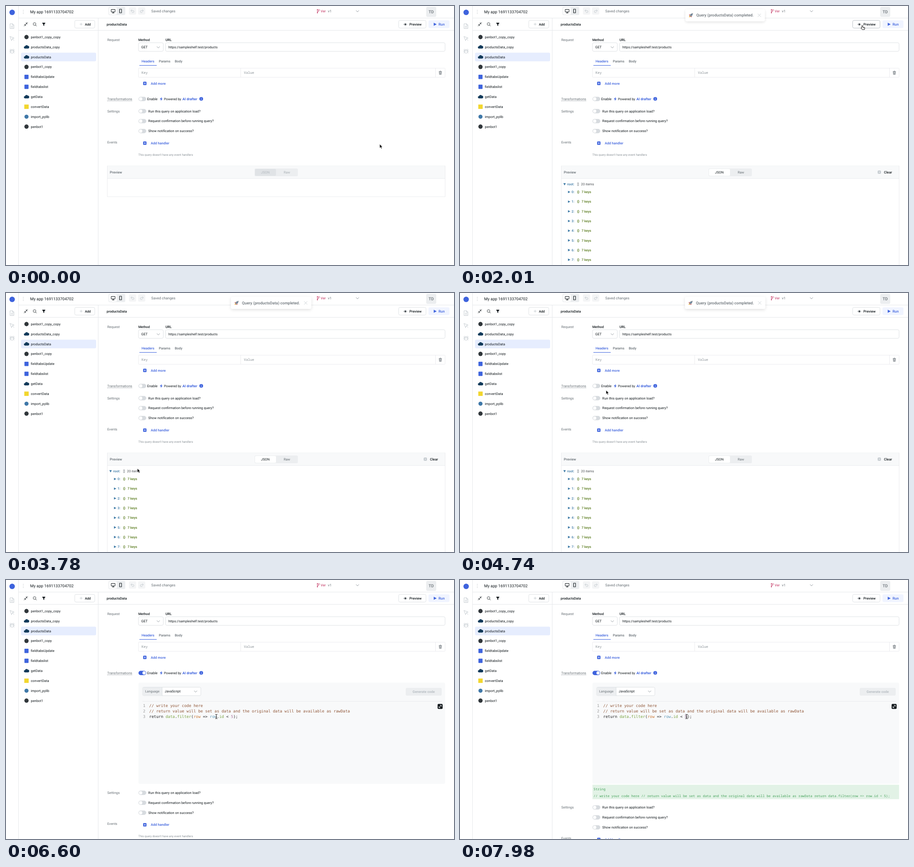
These frames come from a looping animation (984 by 569 pixels, 8 s). An HTML page:

```html
<!DOCTYPE html>
<html lang="en">
<head>
<meta charset="utf-8">
<title>Query editor</title>
<style>
  html, body { margin: 0; width: 100%; height: 100%; overflow: hidden; background: #fff; }
  svg { display: block; width: 100vw; height: 100vh; }
  text { font-family: Roboto, "Open Sans", sans-serif; text-rendering: geometricPrecision; white-space: pre; }
  .mono { font-family: "Noto Sans Mono", "DejaVu Sans Mono", monospace; }
  .code { font-family: "DejaVu Sans Mono", "Noto Sans Mono", monospace; }
</style>
</head>
<body>
<svg id="stage" viewBox="0 0 984 569"></svg>
<script>
const LOOP = 8000;
const INK = '#11181c', GREY = '#687076', SOFT = '#889096', PALE = '#c1c8cd',
      EDGE = '#d7dbdf', LINE = '#e6e8eb', FILL = '#eceef0', PANEL = '#f8f9fa',
      BLUE = '#3e63dd', TREE = '#3d7aa6', GREEN = '#587a1c';

// Drawing helpers; text is centred vertically on y.
const text = (x, y, s, { size = 7.4, color = INK, weight = 400, anchor = 'start', cls = '', id = '' } = {}) =>
  `<text id="${id}" class="${cls}" x="${x}" y="${y + size * 0.35}" font-size="${size}" font-weight="${weight}" fill="${color}" text-anchor="${anchor}">${s}</text>`;
const rect = (x1, y1, x2, y2, fill, stroke = 'none', r = 0, extra = '') =>
  `<rect x="${x1}" y="${y1}" width="${x2 - x1}" height="${y2 - y1}" rx="${r}" fill="${fill}" stroke="${stroke}" stroke-width=".8" ${extra}/>`;
const path = (d, color, width = 0.9, extra = '') =>
  `<path d="${d}" fill="none" stroke="${color}" stroke-width="${width}" stroke-linecap="round" stroke-linejoin="round" ${extra}/>`;
const shape = (d, fill, extra = '') => `<path d="${d}" fill="${fill}" ${extra}/>`;
const dot = (x, y, r, fill, extra = '') => `<circle cx="${x}" cy="${y}" r="${r}" fill="${fill}" ${extra}/>`;
const group = (id, ...parts) => `<g id="${id}">${parts.join('')}</g>`;
const chevron = (x, y) => path(`M${x - 3} ${y - 1.5}l3 3 3-3`, SOFT);
const toggle = (y, id = '') =>
  rect(291, y - 4.7, 308, y + 4.7, EDGE, 'none', 4.7, id && `id="${id}Track"`) +
  dot(295.8, y, 3.6, '#fff', id && `id="${id}Knob"`);
const plusLink = (y, label) =>
  rect(301.2, y - 3.7, 308.6, y + 3.7, BLUE, 'none', 1.5) +
  path(`M303.2 ${y}h3.4M304.9 ${y - 1.7}v3.4`, '#fff', 0.8) +
  text(318, y, label, { size: 7.5, weight: 500, color: BLUE });
const spinner = (id, x, y, r, width, color) =>
  `<g transform="translate(${x} ${y})"><g id="${id}">` +
  path(`M${r * 0.71} ${r * 0.71}A${r} ${r} 0 1 1 ${r * 0.71} ${-r * 0.71}`, color, width) + '</g></g>';

const icons = {
  bot: y => dot(45, y, 4.7, '#30363a'),
  cloud: y => shape(`M42 ${y + 3.5}a2.5 2.5 0 0 1-.3-5 3.6 3.6 0 0 1 6.3-1 3 3 0 0 1 0 6z`, '#123a5a'),
  table: y => rect(40.5, y - 4.7, 49.5, y + 4.7, BLUE, 'none', 1),
  script: y => rect(40.2, y - 4.8, 49.8, y + 4.8, '#f2d62e'),
  snake: y => dot(45, y, 4.5, '#3f78a8')
};
const queries = [
  ['bot', 'penbot1_copy_copy'], ['cloud', 'productsData_copy'], ['cloud', 'productsData'],
  ['bot', 'penbot1_copy'], ['table', 'fieldtabsUpdate'], ['table', 'fieldtabslist'],
  ['cloud', 'getData'], ['script', 'convertData'], ['snake', 'import_pylib'], ['bot', 'penbot1']
];

const frameBars =
  path('M27.5 0V569M202.5 27V569M27.5 26.5H984M27.5 53.5H984', LINE, 1);

const rail =
  dot(13.5, 14, 6, BLUE) +
  path('M9.3 39h5l3 3v7.5h-8zM14.3 39v3h3M11.3 44.5h4M11.3 47h4', PALE) +
  path('M9 67l9 3.5-4 1.4-1.6 4zM14 72l3.5 3.5', PALE) +
  path('M10 99a3.3 3.3 0 0 1 6.6 0v1.5a3.3 3.3 0 0 1-6.6 0zM11.3 96l-1-1.5M15.3 96l1-1.5M10 97.5l-2-1M16.6 97.5l2-1M10 100h-2.2M16.6 100h2.2M10.3 102l-1.8 1.4M16.3 102l1.8 1.4M10 98.6h6.6', PALE);

const topBar =
  [9.5, 13, 16.5].map(y => dot(38, y, 0.6, SOFT)).join('') +
  text(53, 13, 'My app 1691133704702', { size: 8.83 }) +
  rect(225, 2, 262, 20, FILL, 'none', 3) + rect(226.5, 3.3, 243.5, 18.7, '#fff', 'none', 2.5) +
  path('M231.5 7.5h8v5.5h-8zM235.5 13v2.3M233.3 15.3h4.4', INK, 1) +
  path('M249.4 7h4.4v8h-4.4z', INK, 1.1) +
  rect(270, 3, 286, 19, '#f4f5f6', 'none', 3) + rect(290, 3, 306, 19, '#f4f5f6', 'none', 3) +
  path('M276.5 8l-2.3 2.2 2.3 2.2M274.4 10.2h4.6a2 2 0 0 1 0 4.2h-2', PALE) +
  path('M299.5 8l2.3 2.2-2.3 2.2M301.6 10.2h-4.6a2 2 0 0 0 0 4.2h2', PALE) +
  text(319, 11.3, 'Saved changes', { size: 7.9, color: GREY, id: 'saveState' }) +
  path('M684 9v6M687 9.5v1.5a1.6 1.6 0 0 1-1.6 1.6H684', '#c2315f') +
  dot(684, 8.2, 1.1, '#c2315f') + dot(687.4, 8.6, 1.1, '#c2315f') + dot(684, 15, 1.1, '#c2315f') +
  text(691, 11.5, 'Ver', { size: 7.6, color: '#c2315f' }) +
  text(707, 11.5, 'v1', { size: 7.6, color: GREY }) + chevron(772, 11.5) +
  rect(923, 2, 945, 24, FILL, 'none', 3) +
  text(934, 13.3, 'TD', { size: 9, color: GREY, weight: 500, anchor: 'middle' });

const sidebar =
  path('M47.5 36l-3 3M44.3 36.8v2.4h2.4M39.8 44l3-3M43 43.2v-2.4h-2.4', INK) +
  `<circle cx="62.7" cy="39.6" r="3" fill="none" stroke="${INK}" stroke-width=".8"/>` + path('M65 42l2 2', INK, 0.8) +
  shape('M79.8 36.8h6.4v1.2l-2.3 2.6v3.4l-1.8-1v-2.4l-2.3-2.6z', INK) +
  rect(151, 31.5, 195, 48.5, '#fff', EDGE, 3) +
  path('M162.3 40h5.4M165 37.3v5.4', PALE) +
  text(179.7, 40, 'Add', { size: 7.3, weight: 500, anchor: 'middle' }) +
  rect(33, 102.5, 198, 121.5, '#e6edfe', 'none', 3) +
  queries.map(([icon, name], i) => {
    const y = 68.2 + i * 21.87;
    return icons[icon](y) + text(54.5, y, name);
  }).join('');

const queryHeader =
  text(221, 40.2, 'productsData', { weight: 500 }) +
  rect(862.5, 31.5, 922.5, 48.5, '#fff', EDGE, 3, 'id="previewButton"') +
  group('previewLabel',
    path('M873.8 40.5q3.4-4.6 6.8 0-3.4 4-6.8 0z', GREY, 0.8), dot(877.2, 40.5, 1.4, INK),
    text(886, 40, 'Preview', { size: 7.6, weight: 500 })) +
  group('previewBusy', spinner('smallSpin', 892.5, 40, 3.7, 0.9, '#8fa5e6')) +
  rect(928, 31.5, 974, 48.5, '#f0f4ff', 'none', 3) +
  shape('M939.5 36.8l6.4 3.4-6.4 3.4z', BLUE) +
  text(950, 40.2, 'Run', { size: 7.8, weight: 500, color: BLUE });

const request =
  text(222.5, 74, 'Request', { size: 7.5, color: GREY }) +
  text(290.7, 74, 'Method', { size: 7.3, weight: 500 }) + text(350.3, 74, 'URL', { weight: 500 }) +
  rect(291, 80.7, 345.5, 99.6, '#fff', EDGE, 3) + text(297, 90.5, 'GET', { size: 7.6 }) + chevron(334.5, 90.7) +
  rect(350.4, 80.7, 964.4, 99.6, '#fff', EDGE, 3) +
  text(356.7, 90, 'https://sampleshelf.test/products', { size: 7.2 }) +
  text(297.7, 121.3, 'Headers', { size: 7.5, weight: 500, color: BLUE }) +
  text(335.7, 121.3, 'Params', { weight: 500, color: GREY }) +
  text(370.7, 121.3, 'Body', { weight: 500, color: GREY }) +
  rect(293, 130, 331, 131, BLUE) +
  rect(291, 136.6, 964.4, 156.6, '#fff', LINE, 1) +
  path('M515.5 136.6v20M943.5 136.6v20', LINE, 0.8) +
  text(297.8, 146.6, 'Key', { size: 7.5, color: SOFT, cls: 'mono' }) +
  text(522.5, 146.6, 'Value', { size: 7.5, color: SOFT, cls: 'mono' }) +
  path('M951 144.2h6M953 144v-1h2v1M951.6 144.4l.4 6h4l.4-6M953.2 146v3M954.8 146v3', GREY, 0.9) +
  plusLink(170, 'Add more') +
  text(222.5, 204.2, 'Transformations', { color: GREY }) +
  path('M222.5 208.6H277.5', SOFT, 0.7, 'stroke-dasharray="1.5 1.6"') +
  toggle(204.2, 'enable') + text(310, 204.2, 'Enable', { size: 7.6 }) +
  shape('M342 199.8l-4 5.2h2.6l-.9 3.8 4.2-5.3h-2.6z', BLUE) +
  text(347, 204.2, 'Powered by', { size: 7.3 }) +
  text(387.5, 204.2, 'AI drafter', { size: 7.6, weight: 700, color: BLUE }) +
  dot(428.8, 204, 4.1, BLUE) + path('M428.8 203.8v2.2M428.8 201.9v.1', '#fff', 0.9);

const settings = group('settings',
  text(222.5, 231, 'Settings', { size: 7.5, color: GREY }),
  ...['Run this query on application load?', 'Request confirmation before running query?', 'Show notification on success?']
    .map((label, i) => toggle(231 + i * 21.9) + text(312.6, 231 + i * 21.9, label)),
  text(222.5, 299, 'Events', { size: 7.4, color: GREY }),
  plusLink(301.3, 'Add handler'),
  text(290.7, 326.4, "This query doesn't have any event handlers", { size: 6.33, color: SOFT }));

const jsonTree = Array.from({ length: 8 }, (_, i) => {
  const y = 408.6 + i * 21.27;
  return shape(`M237.2 ${y - 2.7}l5 2.7-5 2.7z`, TREE) +
    text(245, y, i + ':', { weight: 500, color: TREE }) +
    text(257.3, y, '{}', { weight: 700, color: GREEN }) +
    text(267, y, '7 keys', { weight: 500, color: GREEN });
}).join('');

const preview = group('preview',
  rect(222.6, 351.2, 964.4, 419, '#fff', LINE, 0, 'id="previewBox"'),
  rect(223, 351.6, 964, 379, PANEL), path('M222.6 379H964.4', LINE, 0.8),
  text(228, 365.4, 'Preview', { size: 7.6, weight: 500, color: GREY }),
  rect(546, 357, 641, 374, FILL, 'none', 2.5),
  group('emptyView',
    rect(547, 358, 593, 373, '#e0e3e6', 'none', 2),
    text(569.5, 365.4, 'JSON', { color: '#b3babf', anchor: 'middle' }),
    text(617, 365.4, 'Raw', { color: '#a9b0b5', anchor: 'middle' })),
  group('panelBusy', spinner('bigSpin', 593.8, 398.3, 7, 1.5, '#6f93c4')),
  group('dataView',
    rect(547, 358, 593, 373, '#fff', 'none', 2),
    text(569.5, 365.4, 'JSON', { anchor: 'middle' }),
    text(617, 365.4, 'Raw', { color: GREY, anchor: 'middle' }),
    rect(917.5, 361.5, 924.5, 368.5, PALE, 'none', 1.5), path('M919.8 363.8l2.4 2.4M922.2 363.8l-2.4 2.4', '#fff', 0.8),
    text(931.3, 365.4, 'Clear', { size: 7.5, weight: 500 }),
    shape('M227 389.2h5.4l-2.7 5z', TREE),
    text(235.6, 391, 'root:', { weight: 500, color: TREE }),
    text(257.3, 391, '[]', { color: GREY }), text(265.8, 391, '20 items', { color: '#4c5155' }),
    jsonTree));

const span = (color, s) => `<tspan fill="${color}">${s}</tspan>`;
const remark = s => span('#8f5536', '/'.repeat(2) + ' ' + s);
const codeLines = [
  remark('write your code here'),
  remark('return value will be set as data and the original data will be available as rawData'),
  'return ' + span('#79a33f', 'data') + '.' + span('#79a33f', 'filter') + '(' + span('#c9752f', 'row') +
    ' =&gt; ' + span('#5795b5', 'row') + '.' + span('#79a33f', 'id') + ' &lt; ' + span('#aa759f', '5') + ');'
];
const editor = group('editor',
  rect(291, 225.5, 964.4, 447.8, PANEL, 'none', 3),
  rect(300, 235.5, 428, 254, '#fff', EDGE, 2.5), rect(300.4, 235.9, 343, 253.6, FILL), path('M343 235.5v18.5', EDGE, 0.8),
  text(305.8, 244.6, 'Language', { size: 7.1, color: GREY }), text(348.6, 244.8, 'JavaScript'), chevron(416.5, 245),
  rect(878, 237, 957, 254, FILL, 'none', 3),
  text(917.5, 245.4, 'Generate code', { size: 7.5, weight: 500, color: '#b0b7bd', anchor: 'middle' }),
  path('M300 266.6H957', LINE, 0.8),
  rect(494, 294.3, 499.5, 306, '#d5d7dc', 'none', 0, 'id="selection"'),
  ...codeLines.map((line, i) => {
    const y = 275.8 + i * 12.2;
    return text(301, y, i + 1, { size: 8.52, color: '#999', cls: 'code' }) +
      text(314.5, y, line, { size: 8.52, color: '#202020', cls: 'code' });
  }),
  group('expand', rect(948, 272.3, 959, 283.3, INK, 'none', 2),
    path('M951 280.3l5-5M953.6 275.2h2.6v2.6M950.8 277.8v2.6h2.6', '#fff', 0.9)),
  group('result', rect(291, 449.8, 964.4, 481.5, '#e2f2e6'),
    text(293.3, 459.5, 'String', { size: 7.29, color: '#46a35b', cls: 'mono' }),
    text(293.3, 474, codeLines.join(' ').replace(/<[^>]+>/g, ''), { size: 7.29, color: '#46a35b', cls: 'mono' })));

// The toast is drawn around its own centre.
const toast = group('toast',
  rect(-88.2, -13.2, 88.2, 13.2, '#fff', 'none', 4, 'filter="url(#shadow)"'),
  `<g transform="translate(-75.8 0) rotate(45)">` +
  shape('M-2 2.5h4l-2 3.6z', '#f5a524') + shape('M-2-1l-2 3.2 2 .6zM2-1l2 3.2-2 .6z', '#d64545') +
  shape('M0-6.5q2.4 2.6 2.4 5.6L1.8 3h-3.6l-.6-3.9q0-3 2.4-5.6z', '#8d989f') + dot(0, -1.6, 1.1, '#3b6fa0') + '</g>',
  text(-64, 0, 'Query (productsData) completed.', { size: 8.55, weight: 500, color: GREY }),
  path('M72.8-3.2l6.4 6.4M79.2-3.2l-6.4 6.4', PALE, 0.8));

const beamPath = 'M-2-4.8q1.6 0 2 1 .4-1 2-1M-2 4.8q1.6 0 2-1 .4 1 2 1M0-4v8M-1 1.2h2';
const cursor = group('cursor',
  group('arrow', shape('M0 0V8.6L2 6.8 3.4 10 5 9.3 3.6 6.2H6.3z', '#000', 'stroke="#fff" stroke-width=".7"')),
  group('hand', shape('M-.9 1q.9-1.5 1.8 0V4l3.8.9q1 .3.9 1.4L5 9.8H-.2L-3 6.4q.2-1.4 2.1 0z', '#fff', 'stroke="#000" stroke-width=".9" stroke-linejoin="round"') +
    path('M2.3 5.3v1.3M4 5.6v1.2', '#000', 0.6)),
  group('beam', path(beamPath, '#fff', 2), path(beamPath, '#000', 0.9)));

document.getElementById('stage').innerHTML =
  `<defs><filter id="shadow" x="-20%" y="-60%" width="140%" height="260%"><feDropShadow dx="0" dy="2" stdDeviation="3" flood-opacity=".13"/></filter></defs>` +
  rect(0, 0, 984, 569, '#fff') + frameBars + rail + topBar + sidebar + queryHeader +
  request + preview + editor + settings + toast + cursor;

const $ = id => document.getElementById(id);
const show = (id, on) => $(id).setAttribute('display', on ? 'inline' : 'none');
const set = (id, name, value) => $(id).setAttribute(name, value);
const mix = (a, b, p) => a + (b - a) * p;
const clamp = p => Math.max(0, Math.min(1, p));
const progress = (t, start, length) => clamp((t - start) / length);

function bezier(x1, y1, x2, y2) {
  const at = (a, b, s) => 3 * a * s * (1 - s) ** 2 + 3 * b * s * s * (1 - s) + s ** 3;
  return x => {
    let low = 0, high = 1;
    for (let i = 0; i < 24; i++) {
      const mid = (low + high) / 2;
      if (at(x1, x2, mid) < x) low = mid; else high = mid;
    }
    return at(y1, y2, low);
  };
}
const toastIn = bezier(0.21, 1.02, 0.73, 1), toastOut = bezier(0.06, 0.71, 0.55, 1);
const easeInOut = p => p * p * (3 - 2 * p);

const LOADING = 870, LOADED = 1770, ENABLED = 5430, IN_EDITOR = 6060, FOCUSED = 7800;
const pointer = [ // time, x, y
  [150, 820.8, 303.5], [520, 947, 30], [780, 883.5, 42], [2040, 883.5, 42],
  [2580, 402, 311], [2670, 316, 357], [2850, 316, 357], [3200, 252, 372],
  [3630, 284, 394], [3660, 284, 388], [3780, 288.5, 385.5], [4350, 288.5, 385.5],
  [4620, 350, 250], [4890, 281, 164], [5040, 281, 164], [5340, 299, 207],
  [5850, 299, 207], [6120, 340, 303], [6270, 340, 303], [6600, 462, 300],
  [7050, 481, 300], [7410, 498, 300]
];

function pointerAt(t) {
  const next = pointer.findIndex(k => k[0] > t);
  if (next < 1) return (next ? pointer[pointer.length - 1] : pointer[0]).slice(1);
  const [t0, x0, y0] = pointer[next - 1], [t1, x1, y1] = pointer[next];
  const p = easeInOut((t - t0) / (t1 - t0));
  return [mix(x0, x1, p), mix(y0, y1, p)];
}

function draw(t) {
  const loading = t >= LOADING && t < LOADED, loaded = t >= LOADED, enabled = t >= ENABLED;
  const [x, y] = pointerAt(t);
  const overPreview = x > 862 && x < 923 && y > 31 && y < 49;
  const overToggle = x > 290 && x < 309 && y > 199 && y < 212;

  show('previewLabel', !loading);
  show('previewBusy', loading);
  show('panelBusy', loading);
  const turn = `rotate(${(t - LOADING) / 750 * 360})`;
  set('smallSpin', 'transform', turn);
  set('bigSpin', 'transform', turn);
  set('previewButton', 'stroke', overPreview && !loading ? '#aab2b8' : EDGE);

  show('preview', !enabled);
  show('emptyView', !loaded);
  show('dataView', loaded);
  set('previewBox', 'height', loaded ? 240 : 67.8);

  const on = easeInOut(progress(t, ENABLED, 200));
  const track = enabled ? [mix(215, 62, on), mix(223, 99, on), mix(247, 221, on)] : [215, 219, 223];
  set('enableTrack', 'fill', `rgb(${track.map(Math.round)})`);
  set('enableKnob', 'cx', mix(295.8, 303.3, on));

  const open = 1 - (1 - progress(t, FOCUSED, 170)) ** 3;
  show('editor', enabled);
  show('expand', t >= IN_EDITOR);
  show('selection', t >= FOCUSED);
  set('result', 'opacity', open);
  set('settings', 'transform', `translate(0 ${enabled ? 236.5 + 32.1 * open : 0})`);
  $('saveState').textContent = t >= 6270 && t < 6500 ? 'Saving...' : 'Saved changes';

  const enter = toastIn(progress(t, LOADED, 350)), leave = toastOut(progress(t, ENABLED, 400));
  show('toast', loaded && leave < 0.999);
  set('toast', 'opacity', mix(0.5, 1, enter) * (1 - leave));
  set('toast', 'transform',
    `translate(582.3 ${21.8 - 53 * (1 - enter) - 38 * leave}) scale(${mix(0.6, 1, enter) - 0.4 * leave})`);

  const kind = t >= 6000 ? 'beam' : (overPreview && !loading) || overToggle ? 'hand' : 'arrow';
  for (const name of ['arrow', 'hand', 'beam']) show(name, name === kind);
  set('cursor', 'transform', `translate(${x} ${y})`);
}

function tick() {
  draw(performance.now() % LOOP);
  requestAnimationFrame(tick);
}
tick();
</script>
</body>
</html>
```
